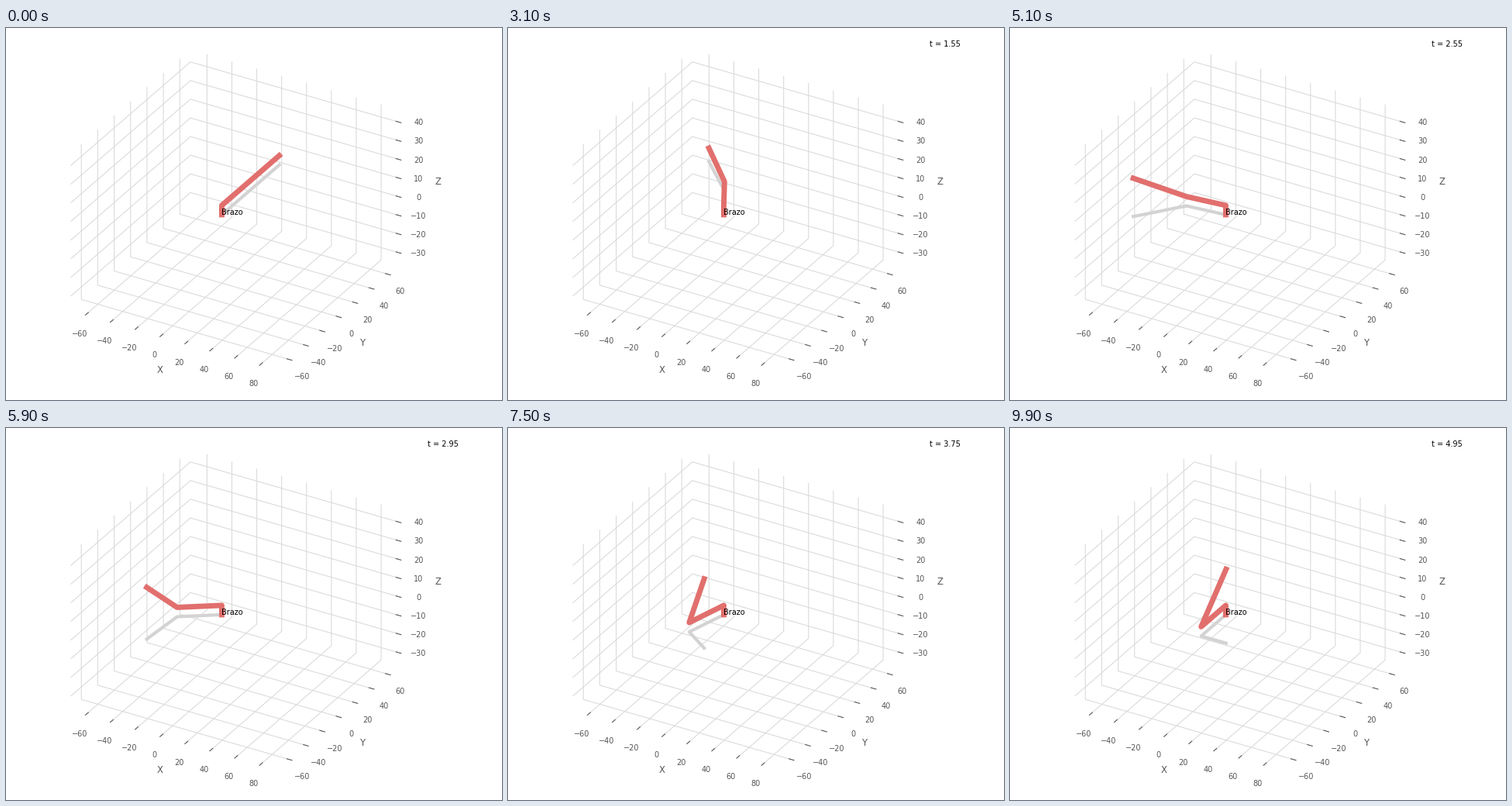
These frames come from a looping animation (640 px wide and 480 px high, 10000 ms). A matplotlib script:

```python
import matplotlib.pyplot as plt
import numpy as np
from matplotlib.animation import FuncAnimation

FRAMES = 100
INTERVAL = 100      # ms
DT = 0.05           # simulated seconds per frame
HEIGHT, UPPER, FORE = 5, 30, 40
Q_START = np.radians([90, 0, 0])
Q_END = np.radians([270, 60, 90])

plt.rcParams.update({
    "font.family": "DejaVu Sans",
    "font.size": 7,
    "axes.labelsize": "large",
    "axes.labelcolor": "#555555",
    "axes.edgecolor": "white",
    "axes.labelpad": 1,
    "xtick.color": "#555555",
    "ytick.color": "#555555",
    "grid.color": "#dbdbdb",
    "grid.linestyle": "-",
    "grid.linewidth": 0.8,
})


def padded(low, high):
    pad = (high - low) / 48
    return low - pad, high + pad


def joint_angles(n):
    """Quintic profile with zero velocity and acceleration at both ends."""
    u = n / (FRAMES - 1)
    s = u**3 * (10 - 15 * u + 6 * u**2)
    return Q_START + s * (Q_END - Q_START)


def arm_points(turn, roll, bend):
    """Base, shoulder, elbow and tip as columns x, y, z."""
    radial = np.array([np.cos(turn), np.sin(turn), 0])
    tangent = np.array([-np.sin(turn), np.cos(turn), 0])
    up = np.array([0, 0, 1])
    side = np.cos(roll) * tangent + np.sin(roll) * up
    shoulder = HEIGHT * up
    elbow = shoulder + UPPER * radial
    tip = elbow + FORE * (np.cos(bend) * radial + np.sin(bend) * side)
    return np.array([0 * up, shoulder, elbow, tip]).T


fig = plt.figure(figsize=(6.4, 4.8), dpi=100, facecolor="white")
ax = fig.add_axes([0, 0, 0.9, 1], projection="3d", proj_type="ortho")
ax.set_facecolor("white")
ax.view_init(elev=30, azim=-60)
ax.set(xlim=padded(-70, 90), ylim=padded(-70, 70), zlim=padded(-35, 45),
       xlabel="X", ylabel="Y", zlabel="Z")
for axis in (ax.xaxis, ax.yaxis, ax.zaxis):
    axis.set_pane_color((1, 1, 1, 1))

shadow, = ax.plot([], [], [], color="lightgrey", linewidth=3)
arm, = ax.plot([], [], [], color="#E16F6D", linewidth=5)
ax.text(0, 0, 0, "Brazo")
timer = fig.text(0.85, 0.95, "")


def draw(n):
    x, y, z = arm_points(*joint_angles(n))
    arm.set_data_3d(x, y, z)
    shadow.set_data_3d(x, y, np.zeros_like(z))
    timer.set_text(f"t = {n * DT:.2f}" if n else "")
    return arm, shadow, timer


anim = FuncAnimation(fig, draw, frames=FRAMES, interval=INTERVAL, repeat=True)
plt.show()
```
